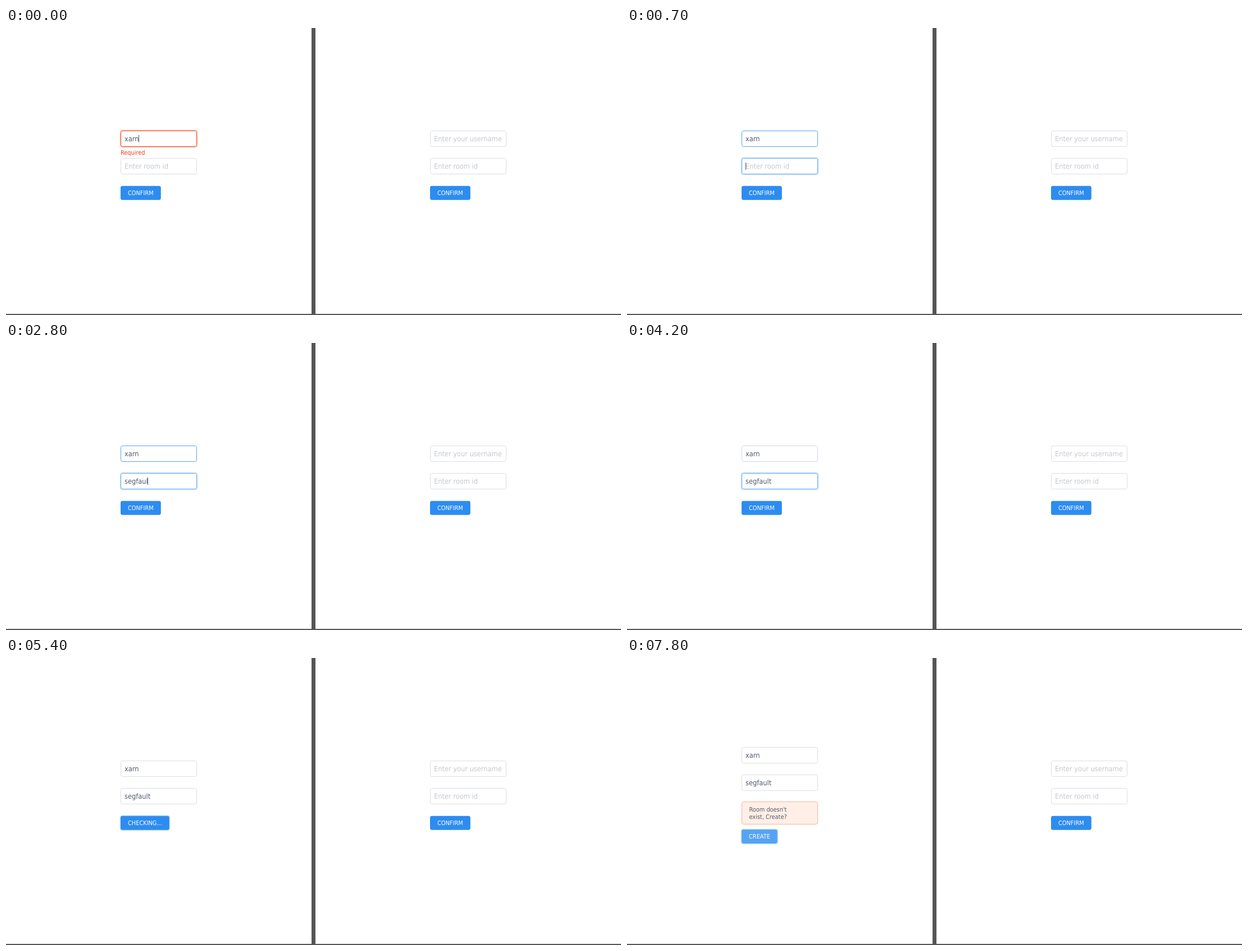
Recreate the animation shown at these times as an HTML page. Size 1095 by 512 pixels, loop 8 s.

```html
<!DOCTYPE html>
<html lang="en">
<head>
<meta charset="utf-8">
<title>Join a room</title>
<style>
  html, body { margin: 0; width: 100%; height: 100%; overflow: hidden; background: #fff; }
  svg { display: block; }
  text { font-family: "DejaVu Sans", sans-serif; text-rendering: geometricPrecision; white-space: pre; }
</style>
</head>
<body>
<svg width="1095" height="512" viewBox="0 0 1095 512">
  <rect width="1095" height="512" fill="#555"/>
  <rect width="544" height="510" fill="#fff"/>
  <rect x="551" width="544" height="510" fill="#fff"/>
  <g id="left"></g>
  <g id="right"></g>
</svg>
<script>
const LOOP = 8000;
const FIELD_SIZE = 12.7, LABEL_SIZE = 10.88;
const CONDENSED = 0.9; // horizontal proportion of the condensed typeface
const BLUE = [45, 140, 240], HOVER = [87, 163, 243], RED = [237, 64, 20], GRAY = [220, 222, 226];
const INK = '#515a6e', HINT = '#c5c8ce';

const rgb = c => `rgb(${c.map(Math.round)})`;
const mix = (a, b, k) => a.map((v, i) => v + (b[i] - v) * k);

const text = (x, y, size, fill, str, extra = '') =>
  `<text transform="translate(${x} ${y}) scale(${CONDENSED} 1)" font-size="${size}" fill="${fill}" ${extra}>${str}</text>`;

const box = (x, y, w, h, r, attrs) =>
  `<rect x="${x}" y="${y}" width="${w}" height="${h}" rx="${r}" ${attrs}/>`;

const ring = (x, y, w, h, spread, color) => spread
  ? box(x - spread, y - spread, w + 2 * spread, h + 2 * spread, 3.6 + spread, `fill="${rgb(color)}" opacity=".2"`)
  : '';

function field(x, y, f, hint) {
  const border = f.border || GRAY;
  return ring(x, y, 136, 29, f.glow, border) +
    box(x + .5, y + .5, 135, 28, 3.2, `fill="#fff" stroke="${rgb(border)}"`) +
    text(x + 7.05, y + 19, FIELD_SIZE, f.value ? INK : HINT, f.value || hint, f.caret ? 'class="active"' : '') +
    (f.caret ? `<rect class="caret" x="${x + 7}" y="${y + 8}" width="1" height="13" fill="${INK}"/>` : '');
}

const BUTTON_WIDTH = { CONFIRM: 71.8, 'CHECKING...': 86.8, CREATE: 63.8 };

function button(x, y, label, hover, glow) {
  const w = BUTTON_WIDTH[label];
  return ring(x, y, w, 25, glow, BLUE) +
    box(x, y, w, 25, 3.4, `fill="${rgb(mix(BLUE, HOVER, hover))}"`) +
    text(x + 13, y + 16.3, LABEL_SIZE, '#fff', label);
}

function notice(x, y) {
  return box(x + .5, y + .5, 135, 40, 3.6, 'fill="#ffefe6" stroke="#ffb08f"') +
    text(x + 13.4, y + 18, LABEL_SIZE, INK, "Room doesn't") +
    text(x + 13.4, y + 31, LABEL_SIZE, INK, 'exist, Create?');
}

function form(x, s) {
  const top = s.notice ? 159 : 183;
  return field(x, top, s.user, 'Enter your username') +
    field(x, top + 49, s.room, 'Enter room id') +
    (s.error ? text(x - .1, 226, LABEL_SIZE, rgb(RED), 'Required', `opacity="${s.error}"`) : '') +
    (s.notice ? notice(x, 256) : '') +
    button(x, s.notice ? 306 : 281.7, s.label, s.hover, s.glow);
}

// Each entry overrides the state reached so far.
const ROOM = 'segfault';
const typed = n => ({ room: { value: ROOM.slice(0, n), border: HOVER, glow: 1.9, caret: true } });
const user = (border, glow = 0, caret = false) => ({ value: 'xarn', border, glow, caret });
const EMPTY = { user: {}, room: {}, error: 0, notice: false, label: 'CONFIRM', hover: 0, glow: 0 };
const idle = typed(8).room;

const steps = [
  [0, { user: user(RED, 1.9, true), error: 1 }],
  [400, { user: user(mix(RED, HOVER, .5), 1), error: .5,
          room: { border: mix(GRAY, HOVER, .5), glow: 1, caret: true } }],
  [700, { user: user(HOVER), error: 0, ...typed(0) }],
  [1100, { room: { ...typed(0).room, caret: false } }],
  ...[1300, 1600, 1900, 2100, 2300, 2600, 2800, 3200].map((t, i) => [t, typed(i + 1)]),
  [3800, { room: { ...idle, caret: false } }],
  [4200, { user: user(mix(HOVER, GRAY, .9)) }],
  [4300, { user: user(GRAY), hover: .65 }],
  [4500, { room: idle, hover: .9 }],
  [4600, { hover: 1 }],
  [4800, { room: { value: ROOM }, label: 'CHECKING...', glow: 1.8 }],
  [5400, { hover: 0 }],
  [7600, { notice: true, label: 'CREATE', hover: .65 }],
  [7800, { hover: 1 }]
];

let state = EMPTY;
const timeline = steps.map(([at, change]) => ({ at, state: state = { ...state, ...change } }));

const left = document.getElementById('left');
document.getElementById('right').innerHTML = form(755, EMPTY);

function placeCaret(s) {
  const caret = left.querySelector('.caret');
  const active = s.user.caret ? s.user : s.room;
  if (!caret || !active.value) return;
  const width = left.querySelector('.active').getComputedTextLength() * CONDENSED;
  caret.setAttribute('x', Math.floor(211.1 + width));
}

let shown = null;
function render(time) {
  const current = timeline.filter(k => k.at <= time).pop().state;
  if (current === shown) return;
  shown = current;
  left.innerHTML = form(204, current);
  placeCaret(current);
}

const start = performance.now();
function tick() {
  render((performance.now() - start) % LOOP);
  requestAnimationFrame(tick);
}
tick();
</script>
</body>
</html>
```
